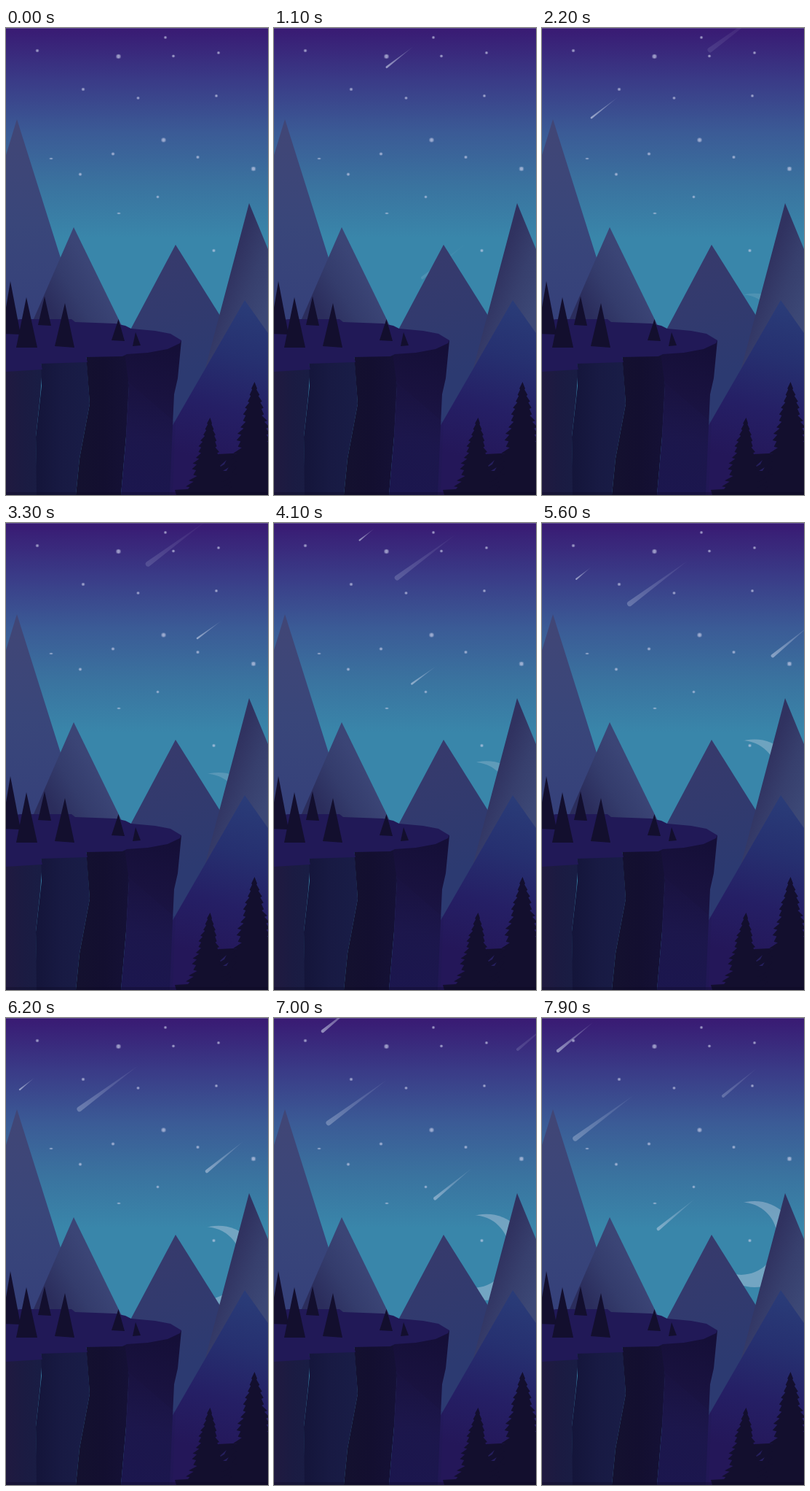
These frames come from a looping animation (360x640 px, 8000 ms). An HTML page with a canvas:

```html
<!DOCTYPE html>
<html lang="en">
<head>
<meta charset="utf-8">
<title>Night cliff</title>
<style>
html, body { margin: 0; width: 100%; height: 100%; overflow: hidden; background: #130f2e; }
canvas { display: block; width: 100vw; height: 100vh; }
</style>
</head>
<body>
<canvas id="stage" width="360" height="640"></canvas>
<script>
const W = 360, H = 640, LOOP = 8000, STEP = 100, START = 200;
const ctx = document.getElementById('stage').getContext('2d');

const layer = () => {
  const c = document.createElement('canvas');
  c.width = W;
  c.height = H;
  return c;
};

function gradient(g, [x0, y0, x1, y1], colors) {
  const fill = g.createLinearGradient(x0, y0, x1, y1);
  colors.forEach((c, i) => fill.addColorStop(i / (colors.length - 1), c));
  return fill;
}

function poly(g, pts, fill) {
  g.beginPath();
  for (let i = 0; i < pts.length; i += 2) g.lineTo(pts[i], pts[i + 1]);
  g.closePath();
  g.fillStyle = fill;
  g.fill();
}

const STARS = [
  [43, 31, 2], [154.5, 39, 3], [219, 13, 1.8], [230, 38.5, 1.8], [292, 34, 1.8],
  [106, 84, 2], [181.5, 96, 1.8], [289, 93, 1.8], [216.5, 153.5, 2.9],
  [147, 172.5, 2], [263.5, 177, 1.9], [340, 193, 2.9], [102, 200.5, 1.9],
  [208.5, 231.5, 1.6], [285.5, 305, 1.9], [62, 179, 2.2, 0.9], [155, 254, 2.2, 0.9]
];

function paintSky(g) {
  g.fillStyle = gradient(g, [0, 0, 0, 288], ['#391a73', '#3a3b87', '#3b5b96', '#3a739f', '#3986aa']);
  g.fillRect(0, 0, W, H);
  g.fillStyle = 'rgba(190,190,215,.3)';
  g.fillRect(0, 0, W, 1);
  for (const [x, y, r, ry = r] of STARS) {
    g.fillStyle = 'rgba(205,210,235,.3)';
    g.beginPath();
    g.ellipse(x, y, r + 0.5, ry + 0.3, 0, 0, 7);
    g.fill();
    g.fillStyle = 'rgba(205,210,235,.5)';
    g.beginPath();
    g.ellipse(x, y, r * 0.75, ry * 0.8, 0, 0, 7);
    g.fill();
  }
}

// A fir with saw-toothed sides that widen towards the ground.
function fir(g, x, top, bottom, left, right, tiers, fill) {
  const sides = side => {
    const pts = [];
    for (let i = 1; i <= tiers; i++) {
      const k = i / tiers, y = top + (bottom - top) * k;
      const reach = side * (0.82 + 0.2 * Math.abs(Math.sin(i * 2.3 + side)));
      const half = (side < 0 ? left : right) * Math.pow(k, 0.82);
      pts.push([x + reach * half, y], [x + reach * half * 0.77, y + 1.5]);
    }
    return pts;
  };
  const path = [[x, top], ...sides(1), ...sides(-1).reverse()];
  poly(g, path.flat(), fill);
}

function paintLand(g) {
  const dark = '#130f2e';

  poly(g, [15, 125, 75, 315, 110, 425, 0, 425, 0, 174],
    gradient(g, [30, 130, 30, 410], ['#414676', '#39467a', '#35407a']));
  poly(g, [233, 297, 350, 483, 350, 560, 160, 560, 160, 434],
    gradient(g, [215, 300, 265, 470], ['#373a6c', '#323a6e', '#2c3a71']));
  poly(g, [93, 273, 163, 416, 163, 450, 20, 450, 20, 440],
    gradient(g, [55, 375, 120, 335], ['#2b2d5c', '#343c6c', '#3b4576']));
  poly(g, [334, 240, 360, 303, 360, 560, 249, 560],
    gradient(g, [300, 350, 362, 375], ['#303260', '#373f6d', '#3c4876']));
  poly(g, [328, 373, 360, 418, 360, 640, 220, 640, 220, 560],
    gradient(g, [325, 375, 265, 590], ['#2a3c78', '#263070', '#251f65', '#241759']));

  // Cliff front, column by column
  poly(g, [0, 465, 50, 465, 47, 505, 41, 560, 43, 640, 0, 640],
    gradient(g, [0, 0, 48, 0], ['#201a40', '#1b1b42', '#191d44']));
  poly(g, [48, 455, 111, 455, 115, 515, 101, 590, 96, 640, 42, 640, 41, 560, 49, 490],
    gradient(g, [42, 0, 114, 0], ['#14153a', '#181a43', '#191d47']));
  poly(g, [110, 448, 167, 446, 169, 490, 165, 560, 158, 640, 96, 640, 101, 590, 115, 515],
    gradient(g, [98, 0, 169, 0], ['#14112f', '#130f30', '#151136']));
  poly(g, [163, 445, 241, 428, 236, 480, 231, 502, 229, 545, 225, 640, 158, 640, 165, 560, 169, 490],
    gradient(g, [230, 440, 180, 630], ['#150f38', '#19123f', '#1b1649', '#19154a']));
  poly(g, [167, 484, 233, 541, 229, 640, 158, 640, 165, 560],
    gradient(g, [195, 500, 185, 640], ['rgba(30,24,82,.1)', 'rgba(30,24,82,.5)']));

  // Cliff top
  poly(g, [0, 402, 20, 399, 90, 399, 95, 403, 150, 405, 164, 408, 172, 412, 205, 415,
    226, 419, 241, 428, 239, 432, 222, 440, 195, 445, 166, 447, 160, 450, 110, 451,
    112, 458, 48, 460, 50, 468, 0, 471], '#211957');

  const cones = [
    [6, 347, -6, 419, 20, 420], [28, 369, 14, 438, 43, 438], [53, 368, 44, 407, 62, 408],
    [81, 377, 67, 436, 94, 438], [154.5, 399, 145, 428, 163, 429], [178, 417, 174, 436, 185, 435]
  ];
  cones.forEach(c => poly(g, c, dark));

  // Foreground firs
  poly(g, [232, 633, 250, 632, 292, 584, 312, 583, 360, 590, 360, 640, 234, 640], dark);
  poly(g, [232, 560, 268, 560, 249, 630, 232, 632], 'rgba(36,24,92,0)');
  fir(g, 280.5, 534, 636, 35, 24, 13, dark);
  fir(g, 341.5, 485, 636, 43, 42, 17, dark);
  poly(g, [294, 600, 303, 592, 300, 598, 295, 601], '#251f5c');
  poly(g, [298, 607, 306, 602, 303, 607], '#251f5c');

  g.fillStyle = 'rgba(10,7,30,.3)';
  g.fillRect(0, 636, W, 4);
}

const sky = layer(), land = layer();
paintSky(sky.getContext('2d'));
paintLand(land.getContext('2d'));

// Head position (x, y) at time t, speed in px per second, tail offset,
// head width, and opacity going from a0 at t0 to a1 at t1.
const METEORS = [
  { t: 2200, x: 231, y: 30, vx: -32.5, vy: 23.7, tail: [80, -59], w: 7, a0: 0.1, t0: 2000, a1: 0.32, t1: 6500 },
  { t: 2200, x: 68, y: 123, vx: -79, vy: 63, tail: [36, -28], w: 2.8, a0: 0.6, t0: 200, a1: 0.6, t1: 3000 },
  { t: 3300, x: 263, y: 158, vx: -92, vy: 78, tail: [33, -24], w: 2.6, a0: 0.6, t0: 2000, a1: 0.5, t1: 5500 },
  { t: 4900, x: 80, y: 52, vx: -47, vy: 35.4, tail: [20, -16], w: 2.2, a0: 0.6, t0: 3400, a1: 0.6, t1: 7100 },
  { t: 6200, x: 276, y: 210, vx: -68.3, vy: 46.5, tail: [50, -41], w: 4.6, a0: 0.5, t0: 4700, a1: 0.45, t1: 7900 },
  { t: 7000, x: 67, y: 18, vx: -50, vy: 30, tail: [48, -39], w: 4.4, a0: 0.55, t0: 6200, a1: 0.55, t1: 7900 },
  { t: 7000, x: 335, y: 43, vx: -95.6, vy: 71, tail: [46, -38], w: 4, a0: 0.14, t0: 6800, a1: 0.26, t1: 7900 },
  { t: 1000, x: 212, y: 336, vx: -80, vy: 63, tail: [60, -47], w: 4, a0: 0.5, t0: 200, a1: 0, t1: 1450 }
];

function ramp(t, t0, a0, t1, a1) {
  const k = Math.min(1, Math.max(0, (t - t0) / (t1 - t0)));
  return a0 + (a1 - a0) * k;
}

function drawMeteor(m, t) {
  if (t < m.t0) return;
  const s = (t - m.t) / 1000, r = m.w / 2;
  const x = m.x + m.vx * s, y = m.y + m.vy * s;
  const [dx, dy] = m.tail;
  const angle = Math.atan2(dy, dx), len = Math.hypot(dx, dy);
  ctx.save();
  ctx.globalAlpha = ramp(t, m.t0, m.a0, m.t1, m.a1);
  ctx.translate(x, y);
  ctx.rotate(angle);
  ctx.fillStyle = gradient(ctx, [0, 0, len, 0], ['rgba(215,222,240,1)', 'rgba(215,222,240,.6)', 'rgba(215,222,240,.2)']);
  ctx.beginPath();
  ctx.arc(0, 0, r, Math.PI / 2, Math.PI * 1.5);
  ctx.lineTo(len, 0);
  ctx.closePath();
  ctx.fill();
  ctx.restore();
}

function drawMoon(t) {
  if (t < 2000) return;
  const lift = (7900 - t) * 0.0198;
  ctx.save();
  ctx.translate(292, 310 + lift);
  ctx.globalAlpha = ramp(t, 2000, 0.12, 6200, 0.36);
  ctx.fillStyle = '#d9dcea';
  // Keep only the part of the disc outside the offset shadow circle.
  const shade = new Path2D();
  shade.rect(-200, -200, 400, 400);
  shade.arc(-18.2, -7.8, 49.7, 0, Math.PI * 2);
  ctx.clip(shade, 'evenodd');
  ctx.beginPath();
  ctx.arc(0, 0, 59, 0, Math.PI * 2);
  ctx.fill();
  ctx.restore();
}

function draw(now) {
  const t = Math.floor((now % LOOP) / STEP) * STEP;
  ctx.drawImage(sky, 0, 0);
  if (t >= START) {
    drawMoon(t);
    METEORS.forEach(m => drawMeteor(m, t));
  }
  ctx.drawImage(land, 0, 0);
}

const begin = performance.now();
function tick() {
  draw(performance.now() - begin);
  requestAnimationFrame(tick);
}
tick();
</script>
</body>
</html>
```
